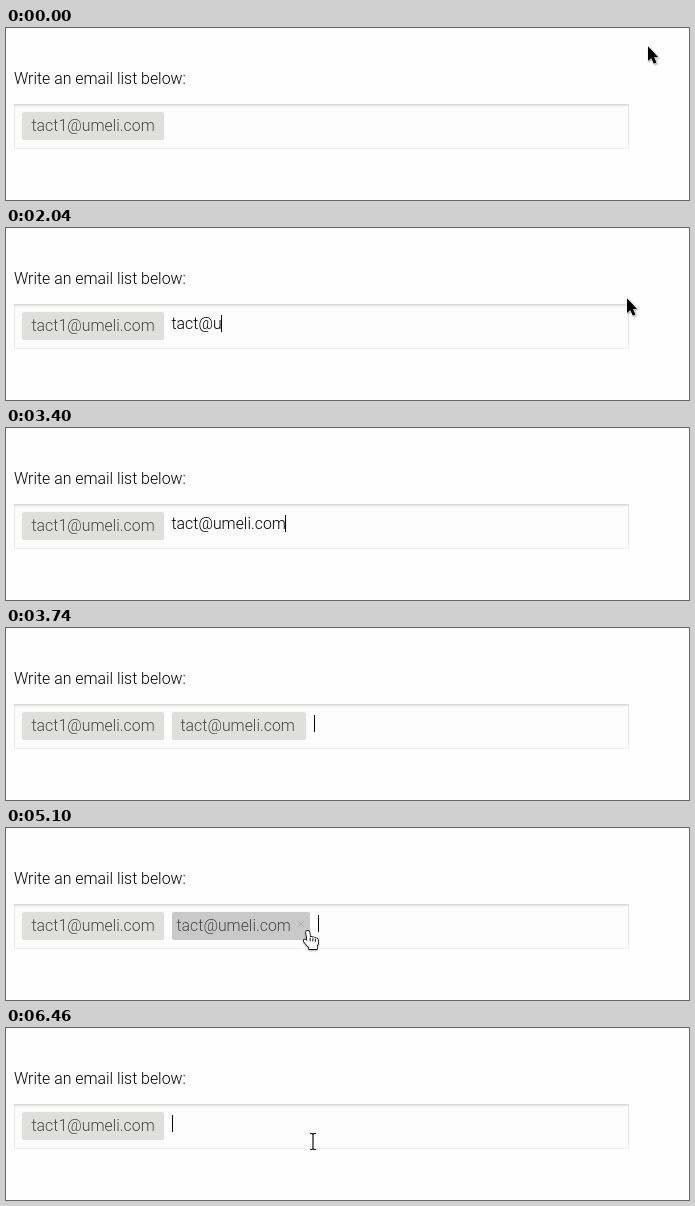
An HTML page with a canvas for the animation above (7140 ms loop, 683 px wide and 172 px high).

```html
<!DOCTYPE html>
<html lang="en">
<head>
<meta charset="utf-8">
<title>Email list field</title>
<style>
html, body { margin: 0; width: 100%; height: 100%; overflow: hidden; background: #fefefe; }
canvas { display: block; width: 683px; height: 172px; }
</style>
</head>
<body>
<canvas id="stage"></canvas>
<script>
const W = 683, H = 172, LOOP = 7140;
const FONT = '300 15.86px Roboto, "Open Sans", sans-serif';
const FIRST = 'tact1@umeli.com', SECOND = 'tact@umeli.com';
const canvas = document.getElementById('stage');
const ctx = canvas.getContext('2d');
const dpr = window.devicePixelRatio || 1;
canvas.width = W * dpr;
canvas.height = H * dpr;

// Each step overrides the state from its time on.
const steps = [
  { at: 0, typed: 0, caret: false, chip: null, pointer: ['arrow', 641, 18] },
  { at: 340, typed: 1, caret: true, pointer: null },
  { at: 680, pointer: ['arrow', 620, 70] },
  { at: 1020, typed: 2 },
  { at: 1360, typed: 4 },
  { at: 2040, typed: 6 },
  { at: 2380, typed: 9 },
  { at: 2720, typed: 11, pointer: null },
  { at: 3060, typed: 12 },
  { at: 3400, typed: 14 },
  { at: 3740, typed: 0, chip: 'plain' },
  { at: 4420, caret: false, pointer: ['arrow', 106, 18] },
  { at: 4760, caret: true, chip: 'hover', pointer: ['hand', 262, 92] },
  { at: 5100, chip: 'dark', pointer: ['hand', 297, 102] },
  { at: 5440, chip: 'strong', pointer: ['hand', 300, 103] },
  { at: 5780, caret: false },
  { at: 6120, chip: 'pressed' },
  { at: 6460, caret: true, chip: null, pointer: ['beam', 303, 104] }
];

function stateAt(t) {
  return Object.assign({}, ...steps.filter(s => s.at <= t));
}

function rect(x, y, w, h, color) {
  ctx.fillStyle = color;
  ctx.fillRect(x, y, w, h);
}

function round(x, y, w, h, r, color) {
  ctx.fillStyle = color;
  ctx.beginPath();
  ctx.roundRect(x, y, w, h, r);
  ctx.fill();
}

function text(str, x, y, color) {
  ctx.fillStyle = color;
  ctx.fillText(str, x, y);
}

function drawField() {
  rect(8, 76, 615, 45, '#fcfcfc');
  rect(8, 76, 615, 1, '#d9d9d9');
  rect(8, 77, 615, 1, '#e4e4e4');
  rect(9, 78, 613, 1, '#f6f6f6');
  rect(8, 78, 1, 43, '#e6e6e6');
  rect(622, 78, 1, 43, '#e6e6e6');
  rect(8, 120, 615, 1, '#f2f2f2');
}

function drawCross(x, y, r, color, width) {
  ctx.strokeStyle = color;
  ctx.lineWidth = width;
  ctx.beginPath();
  ctx.moveTo(x - r, y - r);
  ctx.lineTo(x + r, y + r);
  ctx.moveTo(x + r, y - r);
  ctx.lineTo(x - r, y + r);
  ctx.stroke();
}

function drawSecondChip(mode) {
  const light = mode === 'plain' || mode === 'hover';
  round(166, 84, light ? 134 : 138, 28, 2, light ? '#dfdfde' : '#c9c9c9');
  text(SECOND, light ? 174.5 : 170.5, 103, '#484848');
  if (mode === 'plain') return;
  if (mode === 'pressed') {
    round(288, 86, 13, 20, 3, '#dedede');
    round(289, 87, 11, 18, 2, '#cdcdcd');
  }
  const faint = mode === 'hover' || mode === 'dark';
  const x = light ? 291.5 : 295;
  if (faint) drawCross(x, 96, 3.2, '#b2b2b2', 1);
  else drawCross(x, 96, 3.2, '#707070', 1.7);
}

function outline(path, fill, stroke, width) {
  ctx.lineJoin = 'round';
  ctx.lineWidth = width;
  ctx.strokeStyle = stroke;
  ctx.fillStyle = fill;
  ctx.stroke(path);
  ctx.fill(path);
}

const arrowPath = new Path2D('M1 .5V14.8L4.3 11.8L6.9 17.6L9.2 16.6L6.8 11H10.8Z');
const handPath = new Path2D('M3.3 2.2C3.3.6 5.9.6 6.2 2.2L7 8C7.4 6.8 9.3 6.8 9.7 8.1C10.2 7.3 11.9 7.5 12.3 8.7C13 8.1 14.7 8.6 14.8 10.1C15.2 12.4 14.9 14.2 13.7 16.1V19H6.3V17.2C4.7 15.6 2.6 13.6 1 11.2C.4 9.9 1.9 9.1 3.1 10.2L4.6 11.6Z');
const foldPath = new Path2D('M7 8L7.3 11.2M9.8 8.3V11.4M12.4 8.9V11.6');
const beamPath = new Path2D('M1 1.5H3L4 2.5L5 1.5H7M4 2.5V16.5M1 17.5H3L4 16.5L5 17.5H7');

const pointers = {
  arrow() {
    ctx.shadowColor = 'rgba(0,0,0,.25)';
    ctx.shadowBlur = 2 * dpr;
    ctx.shadowOffsetX = ctx.shadowOffsetY = dpr;
    outline(arrowPath, '#000', '#fff', 1.2);
    ctx.shadowColor = 'transparent';
    ctx.fill(arrowPath);
  },
  hand() {
    ctx.shadowColor = 'rgba(0,0,0,.25)';
    ctx.shadowBlur = 2 * dpr;
    ctx.shadowOffsetY = dpr;
    outline(handPath, '#fff', '#111', 2);
    ctx.shadowColor = 'transparent';
    ctx.fill(handPath);
    ctx.lineWidth = 1;
    ctx.stroke(foldPath);
  },
  beam() {
    ctx.strokeStyle = '#fff';
    ctx.lineWidth = 2.6;
    ctx.stroke(beamPath);
    ctx.strokeStyle = '#111';
    ctx.lineWidth = 1.2;
    ctx.stroke(beamPath);
  }
};

function draw(t) {
  const s = stateAt(t);
  ctx.setTransform(dpr, 0, 0, dpr, 0, 0);
  ctx.font = FONT;
  rect(0, 0, W, H, '#fefefe');
  text('Write an email list below:', 8, 56, '#000');
  drawField();
  round(16, 84, 142, 28, 2, '#dfdfde');
  text(FIRST, 25.5, 103, '#484848');

  let caretX = 166;
  if (s.chip) {
    drawSecondChip(s.chip);
    caretX = s.chip === 'plain' || s.chip === 'hover' ? 308 : 312;
  } else if (s.typed) {
    const typed = SECOND.slice(0, s.typed);
    text(typed, 165.5, 101, '#000');
    caretX = Math.round(165.5 + ctx.measureText(typed).width - 0.5);
  }
  if (s.caret) rect(caretX, 87, 1, 17, '#000');

  if (s.pointer) {
    const [kind, x, y] = s.pointer;
    ctx.save();
    ctx.translate(x, y);
    pointers[kind]();
    ctx.restore();
  }
}

const start = performance.now();
function tick() {
  draw((performance.now() - start) % LOOP);
  requestAnimationFrame(tick);
}
tick();
</script>
</body>
</html>
```
